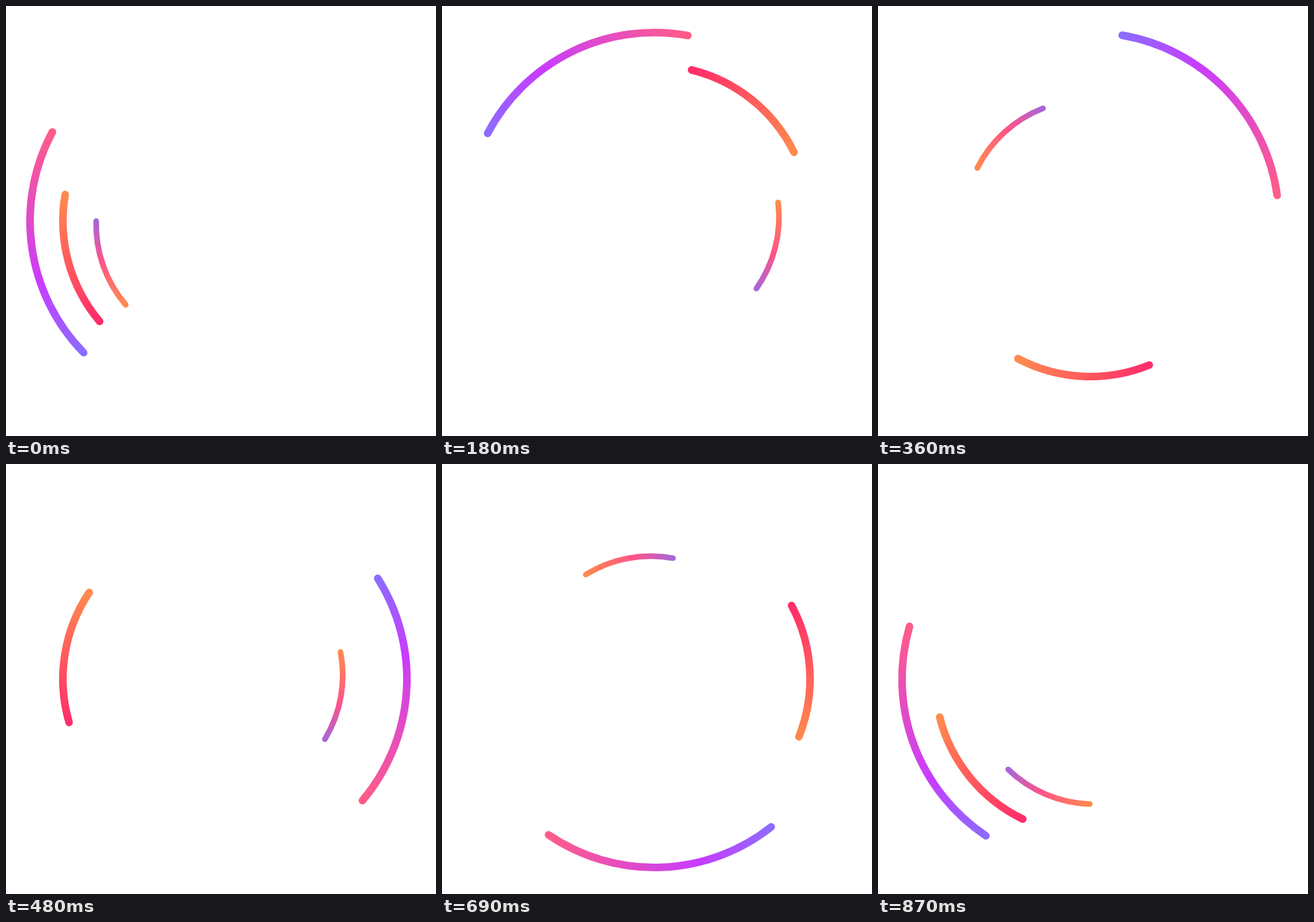
Animation of 680x680 px, one loop 0.9 s. Source, as an HTML page with a canvas:

```html
<!DOCTYPE html>
<html lang="en">
<head>
<meta charset="utf-8">
<title>Spinning arcs</title>
<style>
  html, body { margin: 0; width: 100%; height: 100%; overflow: hidden; background: #fff; }
  canvas { display: block; }
</style>
</head>
<body>
<canvas id="stage" width="680" height="680"></canvas>
<script>
const ctx = document.getElementById('stage').getContext('2d');
const LOOP = 900, STEP = 30;
const rad = degrees => degrees * Math.PI / 180;

// Angles in degrees, clockwise; from/to are relative to the arc's middle.
// turn is the rotation per loop, shift moves the arc along its tangent.
const arcs = [
  { radius: 298, width: 12, middle: 171.95, from: -36.25, to: 36.25, turn: 360, shift: 0,
    stops: [[0, '#8c6cff'], [.33, '#c83cff'], [1, '#ff5c88']] },
  { radius: 246, width: 12, middle: 164.8, from: -25, to: 25, turn: 720, shift: 0,
    stops: [[0, '#ff2d6b'], [1, '#ff8a4e']] },
  { radius: 195.6, width: 9, middle: 158.9, from: -19.35, to: 22.65, turn: 1068, shift: -6,
    stops: [[0, '#ff8a4e'], [.56, '#ff5488'], [1, '#a866d8']] }
];

for (const arc of arcs) {
  const point = a => [arc.radius * Math.cos(rad(a)), arc.radius * Math.sin(rad(a))];
  arc.paint = ctx.createLinearGradient(...point(arc.from), ...point(arc.to));
  for (const [offset, color] of arc.stops) arc.paint.addColorStop(offset, color);
}

function drawArc(arc, progress) {
  ctx.save();
  ctx.translate(336, 340);
  ctx.rotate(rad(arc.middle + arc.turn * progress));
  ctx.translate(0, arc.shift);
  ctx.beginPath();
  ctx.arc(0, 0, arc.radius, rad(arc.from), rad(arc.to));
  ctx.lineWidth = arc.width;
  ctx.lineCap = 'round';
  ctx.strokeStyle = arc.paint;
  ctx.stroke();
  ctx.restore();
}

const start = performance.now();

function draw() {
  // The motion advances in steps; the small margin absorbs timer rounding.
  const elapsed = performance.now() - start + .5;
  const time = Math.floor(elapsed / STEP) * STEP % LOOP;
  ctx.clearRect(0, 0, 680, 680);
  for (const arc of arcs) drawArc(arc, time / LOOP);
  requestAnimationFrame(draw);
}
draw();
</script>
</body>
</html>
```
